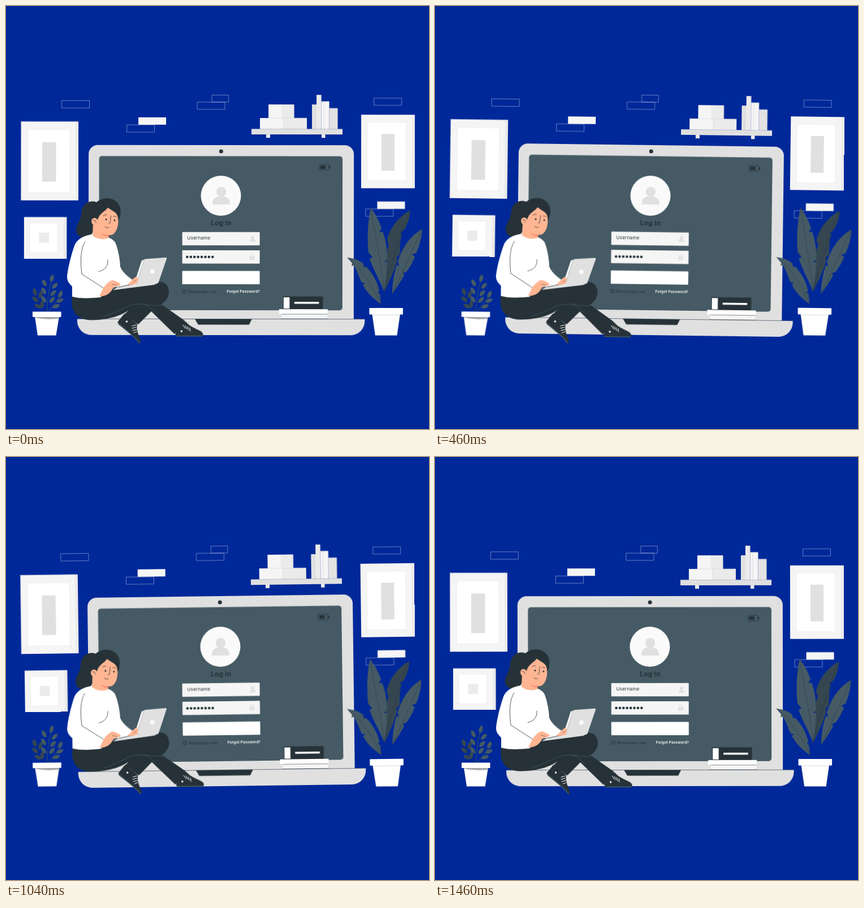
Recreate the animation shown at these times as an HTML page. Size 748 by 748 pixels, loop 1.5 s.

```html
<!DOCTYPE html>
<html lang="en">
<head>
<meta charset="utf-8">
<title>Log in</title>
<style>
  html, body { margin: 0; width: 100%; height: 100%; overflow: hidden; background: #002899; }
  svg { display: block; width: 100vw; height: 100vh; }
  text { font-family: Inter, "Open Sans", sans-serif; fill: #263238; }

  /* One degree each way, drawn at 24 pictures per second */
  @keyframes sway {
    0%     { transform: rotate(.0556deg);   animation-timing-function: steps(9); }
    24.99% { transform: rotate(1.0556deg);  animation-timing-function: step-end; }
    25%    { transform: rotate(.9444deg);   animation-timing-function: steps(18); }
    74.99% { transform: rotate(-1.0556deg); animation-timing-function: step-end; }
    75%    { transform: rotate(-.9444deg);  animation-timing-function: steps(9); }
    100%   { transform: rotate(.0556deg); }
  }
  .sway { animation: sway 1.5s infinite; }
  #wall   { transform-origin: 375px 302px; }
  #laptop { transform-origin: 380px 414px; }
  #woman  { transform-origin: 228px 468px; }
  #herb   { transform-origin: 74px 528px; }
  #palm   { transform-origin: 670px 470px; }

  .ink { fill: #263238; }
  .slate { fill: #455a64; }
  .deep { fill: #354650; }
  .white { fill: #fff; }
  .pale { fill: #f5f5f5; }
  .soft { fill: #ebebeb; }
  .grey { fill: #e0e0e0; }
  .skin { fill: #ffb592; }
  .line { fill: none; stroke: #263238; stroke-width: .8; stroke-linecap: round; stroke-linejoin: round; }
  .thin { stroke-width: .5; }
  .hair { fill: none; stroke: #c9d0ea; stroke-width: .5; }
  .seam { fill: none; stroke: #455a64; stroke-width: .8; }
</style>
</head>
<body>
<svg viewBox="0 0 748 748">
  <defs>
    <path id="leaf" d="M0 6.500C-4.500 3-4.500-4 0-7.500C4.500-4 4.500 3 0 6.500Z"/>
    <g id="user">
      <circle cy="-7" r="8.7"/>
      <path d="M-15.5 15C-16 5-9 .5 0 .5S16 5 15.5 15Q15.5 15.5 15 15.5H-15Q-15.5 15.5-15.5 15Z"/>
    </g>
  </defs>

  <g id="wall" class="sway">
    <path class="hair" d="M98.5 167.5h49v13h-49zM364 157.5h29.5v12.5H364zM338 170h49v12.8h-49zM213.5 210.3h49v12.8h-49zM650.5 162.7h49v12.6h-49zM636 358.6h49v13h-49z"/>
    <path class="pale" d="M234 197h49v13h-49zM656.5 345.5h49v13h-49z"/>

    <path class="soft" d="M122 204.500h6v139.500h-6z"/>
    <path class="pale" d="M26.500 204.500H123V344H26.500z"/>
    <path class="white" d="M38.5 219H113v111H38.5z"/>
    <path class="grey" d="M64 241h24.5v70H64z"/>

    <path class="soft" d="M101 373.500h6.500V447H101z"/>
    <path class="pale" d="M32 373.500h70V447H32z"/>
    <path class="white" d="M42 384h49.5v52H42z"/>
    <path class="soft" d="M58.5 401H76v18H58.5z"/>

    <path class="soft" d="M717 192h6v130h-6z"/>
    <path class="pale" d="M628 192h90v130h-90z"/>
    <path class="white" d="M639 205.5h68.5V309H639z"/>
    <path class="grey" d="M664 226h23v65h-23z"/>
    <path fill="none" stroke="#e0e0e0" stroke-width=".5" d="M26 204l12.5 15H113l10-15M26 344l12.5-14H113l10 14M38.5 219v111M113 219v111M42 384h49.5v52H42zM628 192l11 13.5h68.5l10-13.5M628 322l11-13h68.5l10 13M639 205.5V309M707.5 205.5V309"/>

    <path class="pale" d="M464 174h23v24h-23zM449 198h42v19.5h-42zM557.5 168.5h14v49h-14z"/>
    <path class="soft" d="M487 174h22.5v24H487zM491 198h41v19.5h-41zM549 157h8.5v60.5H549zM460 226h7v7h-7zM558 226h6.5v7H558z"/>
    <path fill="#e3e3e3" d="M541 174h8v43.5h-8zM571.5 180.5h15v37h-15z"/>
    <path class="grey" d="M434 217.5h161V227H434z"/>
    <path fill="none" stroke="#c4c7d2" stroke-width=".5" d="M434 217.5h161M464 198h68M491 198v19M546 174v43M562 168.5v49"/>
  </g>

  <g id="laptop" class="sway">
    <path class="grey" d="M146 553.5V262A16 16 0 0 1 162 246H599A16 16 0 0 1 615 262V553.5z"/>
    <rect class="slate" x="164.5" y="265.5" width="430.5" height="272.5" rx="5"/>
    <circle class="ink" cx="380.3" cy="257" r="3.5"/>
    <path class="grey" d="M126 553.5H634.5V557A25 25 0 0 1 609.5 582H151A25 25 0 0 1 126 557Z"/>
    <path class="line thin" d="M126.5 553.5H634"/>
    <path class="ink" d="M334 553.5H435L430 563.5H340Z"/>

    <rect class="line" x="553.5" y="280" width="17.5" height="10" rx="2"/>
    <path class="ink" d="M555.5 282h9.5v6h-9.5zM571 282.5q2.500 0 2.500 2.500t-2.500 2.500z"/>

    <circle cx="380" cy="335.5" r="35.5" fill="#fafafa"/>
    <use href="#user" class="grey" x="380.5" y="335.5"/>
    <text x="380.500" y="388.2" text-anchor="middle" font-size="11.8" font-weight="700" letter-spacing=".3">Log In</text>

    <rect class="pale" x="311.7" y="399.7" width="137" height="23.5" rx="1"/>
    <rect class="pale" x="311.7" y="432" width="137" height="23.5" rx="1"/>
    <rect class="white" x="311.7" y="468.5" width="137" height="23.5" rx="1"/>
    <text x="320.5" y="413.3" font-size="8" letter-spacing=".25">Username</text>
    <use href="#user" class="grey" transform="translate(436 411.5) scale(.34)"/>
    <path d="M320.5 443.7H366" fill="none" stroke="#263238" stroke-width="4.6" stroke-linecap="round" stroke-dasharray="0 6.4"/>
    <rect class="grey" x="430.5" y="442.5" width="8.7" height="6.2" rx="1"/>
    <path d="M432.5 443v-2a2.400 2.400 0 0 1 4.800 0v2" fill="none" stroke="#e0e0e0" stroke-width="1.2"/>
    <circle class="pale" cx="434.9" cy="445.5" r="1"/>

    <rect class="line" x="312" y="502" width="6" height="6" rx=".8"/>
    <path class="line" d="M313.5 504.800l1.500 1.600 3.200-3.800"/>
    <text x="322" y="507.6" font-size="7.2" letter-spacing=".15">Remember me</text>
    <text x="449" y="507.4" text-anchor="end" font-size="6.6" font-weight="600" letter-spacing=".08" style="fill:#fff">Forgot Password?</text>

    <path class="ink" d="M490 513.5h70.5V536H490z"/>
    <path class="white" d="M491 515h10.5v20H491zM510 523h43.5v3.500H510zM483 536h86v8.500h-86zM488 545h80v7.500h-80z"/>
    <path class="grey" d="M488 544h80v1.600h-80zM489 548h78v1h-78z"/>
    <path class="line thin" d="M488 545h80M487 552.800h82"/>
  </g>

  <g id="woman" class="sway">
    <path class="ink" d="M160 347C146 342 134 351 133 366C133 381 120 390 125 402C130 412 143 411 149 406C156 399 156 392 158 382Z"/>
    <path class="skin" d="M154 382L153 408C158 414 176 416 182 411L181 405C190 407 196 399 198 386L199 366L181 352L163 364Z"/>
    <path fill="#ff8f70" d="M167 400C171 404 176 405 181 404.5L181.5 408C175 408 170 405 167 400Z"/>
    <path class="ink" d="M152 377C149 356 159 341 178 340C194 340 204 352 202.5 366C202 374 200 378 198 379C199 370 194 365 188 362C185 360 182 358 180 356.5C176 363 165 366 162 378Z"/>
    <ellipse class="skin" cx="156.5" cy="381" rx="5.5" ry="6.2"/>
    <path class="line" d="M154 379q4-1 5 4M172 371q3-3 6-2M190 372q3-1 5 1M185.5 371L184 383.5q-1 1.500-2.500 .8M175 390.5q3 3.200 7 1.200"/>
    <circle class="ink" cx="177" cy="377.5" r="1.500"/>
    <circle class="ink" cx="192" cy="379" r="1.500"/>

    <path class="ink" d="M117 514C113 536 123 556 152 555.5C184 555 204 547 217 538L209 545.5L234 563L257 540L298 580L317 557L275 527.5C287 519 290 509 287 499C283 487 272 486 262 489L190 501Z"/>
    <path class="seam" d="M172 549C203 541 212 526 240 527C250 528 257 535 264 541M240 527C258 529 270 531 277 528"/>
    <path class="white" d="M151 404C135 407 125 413 121 424C114 444 109 466 108 479C108 487 112 491 117 496L117 514C132 518 150 517 168 515L173 499L214 495L225 484C212 476 204 467 202 459C201 444 197 426 193 418C190 414 186 411 182 410C172 415 158 412 151 404Z"/>
    <path class="line" d="M140 417C132 428 131 450 134 474L172 498.5M180 449C181 460 175 467 164 469.5M202 459C204 468 214 478 224 484"/>

    <path class="grey" d="M189 502.5L198 497L232 491L270 489L262 493Z"/>
    <path class="pale" d="M244 448.500L230 494L226 493L240 450Z"/>
    <path class="grey" d="M244 449Q245 447.5 247 447.3L282 444.8Q285 444.6 284 447L270 488Q269 490.5 266 491L230 495Z"/>
    <circle cx="258.8" cy="469.5" r="4" fill="#fafafa"/>
    <path class="line" d="M200 497L229 490.5"/>
    <path class="skin" d="M172 499C177 492 184 485 189 485C196 487 202 490 203 493C200 496 193 495 189 499C186 507 177 514 165 513.5Z"/>
    <path class="skin" d="M214 493.500C220 488 226 480 231 478.500L234 484L230 492Z"/>
    <path class="line thin" d="M188 492l8 2M226 488l4-3"/>

    <path class="ink" d="M209 544.500L198 558Q197 561 200 564C211 573 224 581 236 597L238.500 594C237 583 230 578 232 562Z"/>
    <path class="seam" style="stroke-width:1.6" d="M198 560C208 571 223 579 236.500 596"/>
    <path class="ink" d="M311 559L300 577Q298 584 304 584.500H345Q349 584 348.500 580C347 572 328 571 318 558Z"/>
    <path class="seam" style="stroke-width:1.4" d="M301 583.5H347.5"/>
    <path fill="none" stroke="#fff" stroke-width="1" stroke-linecap="round" d="M223 566l7-2M223 570l7-2M224 574l7-2M226 578l5-2M313 564l4 6M317 565l3 6M321 567l2 6M325 569l1 6"/>
    <circle class="white" cx="213.5" cy="558" r="1.700"/>
    <circle class="white" cx="310.5" cy="575" r="1.700"/>
  </g>

  <g id="herb" class="sway">
    <path class="seam" d="M72 541Q74 508 81 481M75 541Q86 526 97 511"/>
    <path class="line thin" d="M70 541Q60 528 51 506"/>
    <g class="slate">
      <use href="#leaf" transform="translate(81 482) rotate(14)"/>
      <use href="#leaf" transform="translate(68 490) rotate(-28)"/>
      <use href="#leaf" transform="translate(86 495) rotate(45)"/>
      <use href="#leaf" transform="translate(67 504) rotate(-32)"/>
      <use href="#leaf" transform="translate(83 508) rotate(43)"/>
      <use href="#leaf" transform="translate(67 519) rotate(-36)"/>
      <use href="#leaf" transform="translate(81 520) rotate(40)"/>
      <use href="#leaf" transform="translate(96 510) rotate(25)"/>
      <use href="#leaf" transform="translate(95 521) rotate(65)"/>
      <use href="#leaf" transform="translate(88 531) rotate(72)"/>
    </g>
    <g class="deep">
      <use href="#leaf" transform="translate(51 506) rotate(-15)"/>
      <use href="#leaf" transform="translate(61 511) rotate(16)"/>
      <use href="#leaf" transform="translate(52 519) rotate(-50)"/>
      <use href="#leaf" transform="translate(64 528) rotate(5)"/>
      <use href="#leaf" transform="translate(57 531) rotate(-62)"/>
    </g>
    <path class="white" d="M51 549H94L88.500 582.500H56Z"/>
    <path fill="#a3a6a8" d="M51 549.500H94L93.500 553Q70 555 51.500 551Z"/>
    <rect class="white" x="47" y="540.5" width="50.5" height="9.5" rx=".8"/>
  </g>

  <g id="palm" class="sway">
    <path class="deep" d="M669 505C672 478 671 456 674 431L677 424L674 414C679 390 697 371 714.5 361.5C714 374 710 386 704 396L697 400L700 403C695 420 698 428 696 440L690 445L692 449C687 468 678 486 669 505Z"/>
    <path class="slate" d="M668.5 505C662 486 650 468 643 447L648 444L641 436C638 408 640 378 645 357C653 368 660 380 664 393L660 400L666 399C672 415 674 430 674 447L669 453L674 453C673 473 671 489 668.5 505Z"/>
    <path class="slate" d="M683 509C683 490 686 473 691 458L695 460L693 452C701 425 717 405 735.5 394.5C735 409 731 424 726 436L718 440L723 443C719 454 714 462 708 470L702 472L704 476C697 489 690 499 683 509Z"/>
    <path class="slate" d="M663 527C650 518 638 507 631 493L635 490L629 489C623 477 621 467 615 459L611 460L612 455C609 451 606 448 603.5 445C615 446 625 449 632 456L633 462L637 461C649 474 657 488 660 504L657 507L661 509Z"/>
    <path class="line thin" d="M668.5 505C664 455 651 400 645 357M669 505C680 455 699 400 714.5 361.5M683 509C700 475 717 435 735.5 394.5M663 527C648 492 628 464 604 445"/>
    <path class="white" d="M647.5 545H697L691.5 582.5H653Z"/>
    <path fill="#c8cbd0" d="M647.5 545.5H697V546.5H648Z"/>
    <rect class="white" x="642.5" y="534" width="59.5" height="11.5" rx=".8"/>
  </g>
</svg>
</body>
</html>
```
